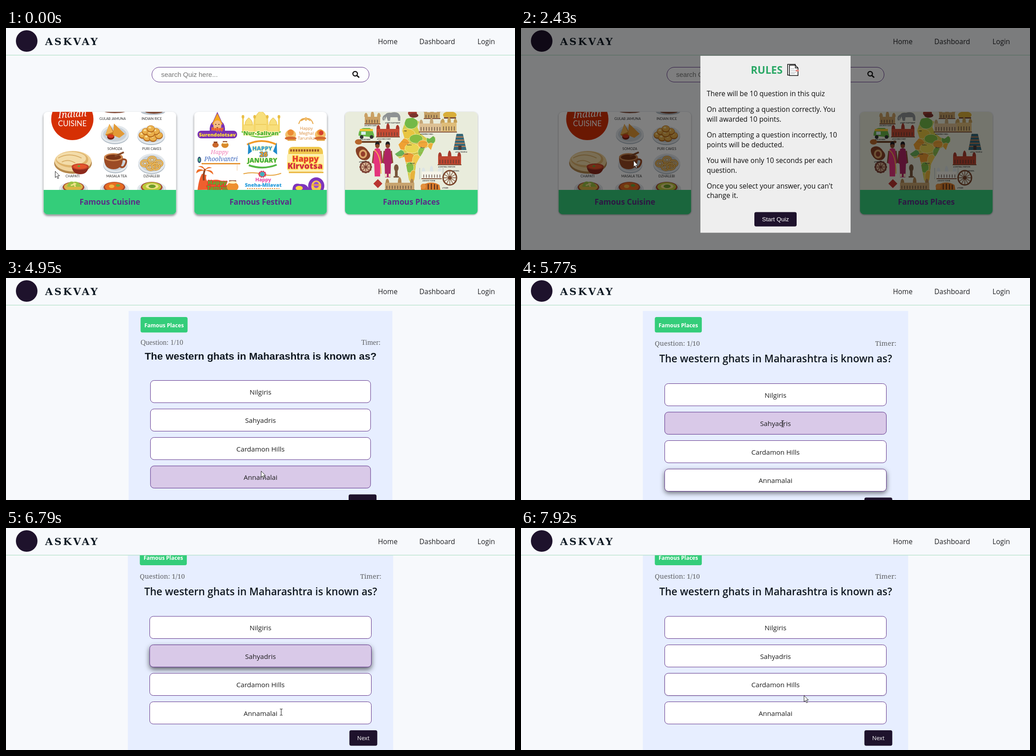
Recreate the animation shown at these times as an HTML page. Size 1132 by 495 pixels, loop 7.99 s.

```html
<!DOCTYPE html>
<html lang="en">
<head>
<meta charset="utf-8">
<title>Quiz site</title>
<style>
html, body { margin: 0; width: 100%; height: 100%; overflow: hidden; background: #f7f9fc; }
svg { display: block; width: 100%; height: 100%; font-family: "Open Sans", sans-serif; }
.sans { font-family: "Liberation Sans", sans-serif; }
.serif { font-family: "Liberation Serif", serif; }
.slab { font-family: "Noto Serif", serif; }
.brand { font-family: "DejaVu Serif", serif; font-weight: 700; letter-spacing: 3.5px; }
.label { font-family: Lato, sans-serif; }
.script { font-family: "Noto Serif", serif; font-style: italic; }
.outlined { paint-order: stroke; stroke-linejoin: round; font-weight: 800; }
.mid { text-anchor: middle; }
.end { text-anchor: end; }
.w5 { font-weight: 500; }
.w6 { font-weight: 600; }
.w7 { font-weight: 700; }
</style>
</head>
<body>
<svg id="stage" viewBox="0 0 1132 495"></svg>
<script>
const LOOP = 7990, INK = '#1e122c', PURPLE = '#5b2d87', GREEN = '#34cd7a';

// Drawing helpers returning SVG markup
const rect = (x, y, w, h, fill, more = '') => `<rect x="${x}" y="${y}" width="${w}" height="${h}" fill="${fill}" ${more}/>`;
const oval = (x, y, rx, ry, fill, more = '') => `<ellipse cx="${x}" cy="${y}" rx="${rx}" ry="${ry}" fill="${fill}" ${more}/>`;
const path = (d, fill, more = '') => `<path d="${d}" fill="${fill}" ${more}/>`;
const line = (d, color, width, more = '') => path(d, 'none', `stroke="${color}" stroke-width="${width}" ${more}`);
const text = (x, y, size, fill, cls, s, more = '') => `<text x="${x}" y="${y}" font-size="${size}" fill="${fill}" class="${cls}" ${more}>${s}</text>`;
const group = (id, body, more = '') => `<g id="${id}" ${more}>${body}</g>`;
const ring = (n, fn) => Array.from({ length: n }, (_, i) => fn(Math.cos(i * 2 * Math.PI / n), Math.sin(i * 2 * Math.PI / n), i)).join('');

function cuisineArt() {
  const plate = (x, y, rx = 31, ry = 20) => oval(x, y + 1, rx, ry, '#aeb9c3') + oval(x, y - 1, rx, ry, '#e3e8ec') + oval(x, y - 1, rx - 5, ry - 4, '#c9d1d8');
  const bowl = (x, food) => plate(x, 359, 32, 15) + oval(x, 355, 24, 12, '#a8482f') + oval(x, 354, 21, 10, food);
  const name = (x, y, s) => text(x, y, 7.6, '#333', 'label mid', s);
  const fried = (x, y) => oval(x, y, 9, 8, '#b76b1d') + oval(x, y - 1, 8, 6.5, '#eab04b') + oval(x - 2, y - 3, 3, 2, '#f9dd94');
  const curl = (x, y) => oval(x, y, 9, 7, 'none', 'stroke="#b8791e" stroke-width="4"') + oval(x, y, 9, 7, 'none', 'stroke="#efc168" stroke-width="2.5"') + oval(x, y, 4, 3, 'none', 'stroke="#dca23e" stroke-width="2"');
  return oval(147.5, 203, 47, 47, '#d63004') +
    text(148, 199, 21, '#fff', 'script mid', 'Indian', 'transform="rotate(-4 148 199)"') + text(147.5, 219, 16.5, '#fff', 'label mid', 'CUISINE') +
    oval(242, 185, 25, 5, '#8b5643') + oval(327, 187, 27, 7, '#bcc5cd') + oval(329, 186, 20, 5, '#7e4933') +
    plate(242, 238) + path('M221 238 230 214 244 239 232 246Z', '#c7751d') + path('M238 239 240 213 264 236 252 245Z', '#e39a36') + path('M221 238 230 214 238 232Z', '#f0b659') +
    oval(233, 243, 8, 6, '#7c2215') + oval(233, 241, 7, 4, '#d93a20') +
    plate(323, 240) + [[304, 239], [314, 245], [327, 246], [340, 240], [311, 231], [333, 231], [322, 236], [322, 225]].map(p => fried(...p)).join('') +
    oval(149, 301, 42, 24, '#b68a4e') + oval(149, 297, 41, 23, '#f0d39b') + oval(147, 293, 36, 18, '#dfb46c') + oval(145, 291, 33, 15, '#f3dca9') + line('M116 290q24-14 52 0M124 299q14-8 30 2', '#d8ae68', 2) +
    path('M146 308h38q-2 18-19 18t-19-18Z', '#8d2a1c') + oval(165, 309, 19, 7, '#c2422a') + oval(165, 309, 15, 5, '#e5562b') + oval(162, 308, 3, 2, '#6aa53a') +
    plate(243, 304, 27, 19) + path('M218 289h42q0 26-21 26t-21-26Z', '#9c4b25') + line('M258 293q13-2 8 10t-13 5', '#9c4b25', 4) + oval(239, 288, 21, 9, '#d08a52') + oval(239, 288, 17, 6, '#7b3617') + line('M242 286 262 277', '#874b2a', 4) +
    plate(324, 303, 30, 22) + [[309, 302], [325, 294], [339, 302], [322, 310], [333, 309]].map(p => curl(...p)).join('') +
    bowl(150, '#d9b647') + path('M136 354q3-15 14-11 13-3 17 11Z', '#9ac143') + line('M144 351l12-4M151 345l3 9', '#f1e28b', 3) +
    bowl(241, '#e66b22') + oval(235, 353, 6, 4, '#f2b340') + oval(249, 351, 5, 3, '#6ea53c') +
    bowl(324, '#b9c93a') + oval(325, 353, 14, 6, '#f1e28b') + oval(325, 353, 8, 4, '#6d9d2d') +
    [[237, 205, 'GULAB JAMUNA'], [324, 205, 'INDIAN RICE'], [242, 272, 'SOMOZA'], [324, 272, 'PURI CAKES'], [148, 332.5, 'CHAPATI'], [246, 332.5, 'MASALA TEA'], [324, 332.5, 'DZHALEBI']].map(n => name(...n)).join('');
}

function festivalArt() {
  const sign = (x, y, size, fill, edge, width, s) => text(x, y, size, fill, 'outlined mid', s, `stroke="${edge}" stroke-width="${width}"`);
  const dome = (x, y, r) => path(`M${x - r} ${y}q-2-${r} ${r}-${2 * r} ${r + 2} ${r} ${r} ${2 * r}Z`, '#f8df7c', 'stroke="#e4bc43"');
  const pot = (x, y, r, c) => oval(x, y, r, r * .8, c) + rect(x - r * .6, y - r * 1.1, r * 1.2, 3, '#8b3f1f');
  return path('M453 231q-1-16 7-22l10-22 10 22q8 6 7 22Z', '#7931b5') + path('M458 215l12-25 12 25Z', '#f3a71f') + oval(470, 217, 9, 11, '#f6bd82') + line('M465 215h3m4 0h3m-7 7h4', '#5f2b20', 1.5) +
    rect(426, 229, 88, 17, '#7931b5', 'rx="8"') + sign(470, 228, 8, '#e83832', '#f6c12a', 1, 'Happy') + sign(470, 242, 11, '#ffe431', '#7931b5', 4, 'Surendolotsav') +
    rect(528, 215, 78, 16, '#f8df7c') + dome(567, 215, 16) + [540, 594].map(x => dome(x, 216, 8)).join('') + [527, 553, 581, 607].map(x => rect(x - 2, 198, 4, 33, '#f5d66a') + oval(x, 198, 3, 4, '#e9bf47')).join('') + line('M567 184v-8', '#dfb238', 2) +
    line('M524 231q43 25 87 0', '#74c843', 3) + sign(567, 239, 13, '#47ad32', '#fff4b4', 3, 'Nur-Salivan') +
    line('M651 214q4-14 16-12 12-2 16 12M656 207l11-6 10 6', '#e9aa4c', 2) + oval(667, 203, 3, 4, '#f3bd6a') +
    ['Happy', 'Meghal', 'Tarunika'].map((s, i) => text(668, 227 + i * 11, 9.5, '#d98a38', 'w5 mid', s)).join('') +
    [633, 699].map(x => oval(x, 238, 12, 11, '#f3c16c') + oval(x, 233, 7, 7, '#ec8c33') + oval(x, 246, 13, 4, '#d56a31')).join('') + oval(701, 234, 5, 5, '#d43f2d') + line('M626 250h19M691 250h18', '#e3a343', 3) +
    pot(466, 261, 7, '#c9672c') + pot(487, 261, 8, '#d98a2b') + oval(487, 256, 6, 2, '#fff0c9') +
    text(475, 281, 13, '#f07db5', 'script mid', 'Happy') + text(478, 297, 13.5, '#3b65bd', 'script mid', 'Phoolvantri') + oval(430, 294, 4, 7, '#304f78') + oval(430, 294, 2, 4, '#58bd8c') +
    rect(435, 301, 86, 3, '#e69638') + line('M514 303v15', '#efc291', 1) +
    line('M536 260q32-16 66 0', '#f29b28', 4) + line('M540 306q31 11 62-1', '#55b843', 4) + path('M539 255l8 20-9 7Zm63 0l-8 20 9 7Z', '#218bcb') +
    sign(570, 273, 13, '#2f9bd4', '#fff6b4', 2.5, 'HAPPY') + sign(573, 287, 15, '#f59e27', '#2685c3', 2, '26') + sign(570, 300, 14, '#37ac3d', '#fff6b4', 2, 'JANUARY') +
    rect(625, 278, 82, 43, '#fdf0b4', 'rx="8"') + path('M628 281q-2-17 12-16h52q14-1 13 16Z', '#f0c84e') + line('M632 273h66', '#9b5227', 5, 'stroke-dasharray="4 2"') + line('M629 322h77', '#eab43c', 3) +
    sign(666, 298, 18, '#e33a2b', '#ffe05f', 4, 'Happy') + sign(665, 314, 18, '#cf2840', '#ffe05f', 4, 'Kirvotsa') +
    path('M426 361q3-25 10-36l10 3q-3 8 2 14 35-13 46 18Z', '#ef5f2e') + line('M440 340q-2-15 3-26', '#8a4322', 4) + path('M442 318q-18-9-19 6 9-7 19-6 18-5 19 9-8-9-19-9-2-14-15-9 11 1 15 9 6-12 16-6-11 0-16 6Z', '#ee6e28') +
    sign(470, 349, 13, '#57b72e', '#e6372b', 3, 'Happy') + sign(470, 361, 13, '#57b72e', '#e6372b', 3, 'Tamrul') + pot(504, 354, 13, '#ee902f') + oval(504, 344, 10, 3, '#fff0c2') +
    line('M528 325q22-5 42 1 19 6 42-2', '#e6a23a', 2) + ring(10, (c, s) => oval(570 + c * 7, 326 + s * 6, 2, 2, '#d83b57')) + oval(570, 326, 5, 5, '#40aebd') +
    text(572, 342, 11, '#e7399c', 'w7 mid', 'Happy') + sign(572, 354, 11, '#2f9edc', '#e4f6ff', 1, 'Sneha-Milavat') + line('M536 358h72', '#e69638', 2, 'stroke-dasharray="3 2"') +
    oval(690, 352, 18, 19, '#7e36bc') + oval(690, 353, 11, 13, '#f2c94e') + oval(690, 350, 6, 7, '#9a4ed2') + path('M637 361q1-18 17-13 15-2 21 13Z', '#7e36bc') + oval(652, 357, 8, 5, '#ffd93d') + line('M680 350h21', '#f2a53c', 3);
}

function placesArt() {
  const building = (x, y, w, h, c, roof = c) => rect(x, y, w, h, c) + rect(x - 1, y + h - 2, w + 2, 2, '#81523c') +
    line(`M${x + 3} ${y + h * .6}h${w - 5}`, '#513d36', h * .42, 'stroke-dasharray="2 4" opacity=".65"') +
    [.08, .5, .92].map((k, i) => path(`M${x + w * k - 4} ${y}q0-${i == 1 ? 11 : 8} 4-${i == 1 ? 13 : 9} 4 ${i == 1 ? 3 : 2} 4 ${i == 1 ? 13 : 9}Z`, roof)).join('');
  const caption = (x, y, s) => text(x, y, 4, '#333', 'label w7', s);
  const land = 'M890 202l15-2 14 9-4 12 6 14 12 9 9 3 8-6 5 3v9l-6 7-4 12-6-7-8 4-6 12-6 9-7 13-2 18-2 17-6 12-6-12-6-33-4-18-11 4-10-10 13-9-5-12 13-15-5-17Z';
  const states = [[901, 212, 15, 13, '#73b948'], [893, 236, 17, 11, '#e8c541'], [912, 247, 15, 10, '#86bd42'], [884, 259, 14, 13, '#f0a133'], [903, 268, 16, 11, '#e9d552'], [874, 279, 12, 8, '#69b35a'], [927, 259, 11, 9, '#f1a63a'], [925, 277, 9, 11, '#8bc350'], [895, 289, 14, 11, '#ee9b32'], [913, 294, 9, 12, '#f0ca4c'], [898, 311, 9, 12, '#7fbd48'], [906, 332, 8, 15, '#e7b33d'], [945, 249, 10, 10, '#6eb64d'], [945, 264, 7, 8, '#edb03a']];
  const person = (x, dress, legs) => oval(x, 262, 5, 6, '#8a4b2c') + path(`M${x - 5} 261q0-8 5-8t5 8q-5-4-10 0Z`, '#201c20') + path(`M${x - 6} 270q6-4 12 0l5 31-4 2-1 ${legs}h-12l-1-${legs}-4-2Z`, dress) + line(`M${x - 8} 274l-3 27m19-27 3 27`, '#8a4b2c', 2.5);
  return rect(754, 187, 295, 175, '#e9ecdc') +
    `<clipPath id="land"><path d="${land}"/></clipPath>` +
    group('map', path(land, '#d5cb49') + states.map(s => oval(...s, 'stroke="#fff5c4" stroke-width=".7"')).join('') + line('M872 252l35 6 40-5M866 286l35-5 36-4M888 308l26-4', '#b48a36', .6) +
      [[885, 231], [892, 262], [922, 268], [884, 282], [899, 303]].map(([x, y], i) => caption(x, y, ['Hill', 'Delta', 'River', 'Coast', 'South'][i])).join(''), 'clip-path="url(#land)"') +
    building(798, 198, 34, 17, '#caa064') + path('M842 207q-3-20 14-18 18-5 21 9v9h-5l-1-8h-16l-1 8h-5l-3-10Z', '#8e9293') + line('M844 194q-8 5-4 12', '#8e9293', 3) +
    oval(904, 190, 10, 7, '#a23c30') + oval(907, 195, 10, 5, '#7a332d') + building(930, 188, 35, 15, '#c5a064') + oval(987, 194, 15, 8, '#d9ae39') + rect(974, 199, 27, 3, '#784b37') +
    path('M784 240q0-16 12-17h13q9 5 10 21Z', '#67b447') + rect(787, 225, 29, 5, '#f0c433') + rect(790, 231, 10, 7, '#d6efed') + [791, 813].map(x => oval(x, 243, 4, 4, '#333')).join('') +
    building(824, 225, 51, 19, '#c54a34', '#a9372a') + building(919, 213, 55, 20, '#ddc094', '#c6a777') + building(969, 211, 33, 22, '#dfbd7a', '#c6a056') +
    line('M780 254h48', '#6d4125', 4) + oval(784, 254, 8, 6, '#b6672d') + oval(831, 254, 4, 3, '#6d4125') +
    path('M782 266q13-7 23 8 11 12-2 20-15 4-23-12-5-13 2-16Z', '#874126') + oval(794, 281, 9, 10, '#dba76a') + oval(794, 281, 5, 6, '#943e2b') +
    ring(12, (c, s) => oval(800 + c * 10, 310 + s * 10, 4, 4, '#7d4336')) + oval(800, 310, 10, 10, '#d9b494') + ring(8, (c, s) => line(`M800 310l${c * 9} ${s * 9}`, '#7d4336', 1.5)) + oval(800, 310, 3, 3, '#7d4336') +
    person(826, '#e4347c', 28) + line('M819 272q15 10 15 53', '#f3be45', 2) + person(849, '#ae2463', 30) + line('M845 325v7m8-7v7', '#f1dfbd', 4) +
    oval(868, 312, 5, 8, '#78563c') + rect(865, 317, 6, 15, '#78563c') + line('M862 332h12', '#78563c', 3) +
    path('M1002 236h14l8 36h-29Z', '#376878') + line('M1001 243h16M999 250h20M998 257h22M996 264h26', '#ce8150', 2) + rect(1006, 262, 7, 10, '#473b3b') +
    building(961, 286, 51, 20, '#bd452f', '#a53b2c') + building(925, 320, 43, 17, '#f6f4e9', '#dce4e5') + rect(919, 312, 2, 25, '#c8cfcb') + rect(971, 312, 2, 25, '#c8cfcb') +
    oval(987, 334, 15, 16, 'none', 'stroke="#79442a" stroke-width="3"') + ring(12, (c, s) => line(`M987 334l${c * 14} ${s * 15}`, '#79442a', 1.3)) + oval(987, 334, 4, 4, '#79442a') +
    path('M827 337l10 10-10 10-10-10Z', '#b93531') + building(843, 345, 65, 17, '#c7a36e', '#b18650') + path('M923 361q-2-13 10-14 16-6 31 3l2 11Z', '#d77a2b') + oval(928, 353, 6, 6, '#e3903d') + line('M939 348v12m7-13v13m7-12v12m6-10v10', '#4c2c1d', 2) +
    [[797, 219, '•NORTH GATE'], [843, 213, '•GREY ELEPHANT'], [825, 249, '•OLD RED FORT'], [787, 250, '•RICKSHAW'], [921, 238, '•MARBLE HALL'], [785, 300, '•PAISLEY'], [999, 278, '•HILL TEMPLE'], [961, 311, '•CENTRAL STATION'], [992, 320, '•WHEEL'], [926, 342, '•WHITE TOMB'], [970, 358, '•TIGER']].map(c => caption(...c)).join('');
}

const card = (i, title, art) => {
  const x = 83.5 + i * 335.2;
  return `<clipPath id="clip${i}"><rect x="${x}" y="187" width="295" height="228.5" rx="9"/></clipPath>` +
    rect(x, 187, 295, 228.5, '#fff', `rx="9" id="card${i}"`) +
    `<g clip-path="url(#clip${i})"><svg x="${x}" y="187" width="295" height="174.5" viewBox="${x} 187 295 174.5">${art}</svg>${rect(x, 361, 295, 55, GREEN)}</g>` +
    text(x + 147.5, 394, 17.3, PURPLE, 'w7 mid', title);
};

const home = rect(324.5, 87.5, 483, 33, '#fdfeff', `rx="16.5" stroke="${PURPLE}"`) +
  text(345, 108.5, 14.9, '#757575', 'sans', 'search Quiz here...') +
  oval(776.5, 102, 5, 5, 'none', 'stroke="#111" stroke-width="2.4"') + line('M780.5 106l5 4.5', '#111', 3) +
  card(0, 'Famous Cuisine', cuisineArt()) + card(1, 'Famous Festival', festivalArt()) + card(2, 'Famous Places', placesArt());

const OPTIONS = ['Nilgiris', 'Sahyadris', 'Cardamon Hills', 'Annamalai'];
// Before the web fonts arrive the panel is slightly narrower and tighter
function quiz(id, loaded) {
  const grow = loaded ? 1.7 : 0, top = loaded ? 235.5 : 228.5, small = loaded ? 'slab' : 'serif';
  const size = loaded ? 14.8 : 16, base = loaded ? 151 : 149;
  return group(id, rect(272.7 - grow, 73.5, 586.6 + 2 * grow, 600, '#e7eeff') +
    rect(299.3 - grow, 87, 104.5, 34.5, GREEN, 'rx="4"') + text(351.5 - grow, 109.5, 12, '#fff', 'w7 mid', 'Famous Places') +
    text(299.3 - grow, base, size, '#5e6063', small, 'Question: 1/10') + text(833 + grow, base, size, '#5e6063', `${small} end`, 'Timer:') +
    text(566.3, loaded ? 188 : 182, 22.7, '#101820', loaded ? 'w6 mid' : 'sans w7 mid', 'The western ghats in Maharashtra is known as?') +
    OPTIONS.map((name, i) => rect(321.3 - grow, top + i * 63.5, 489.5 + 2 * grow, 49.5, '#fff', `rx="8" stroke="${PURPLE}" class="option${i}"`) +
      text(566, top + 31 + i * 63.5, 15.1, '#1c1c1c', 'mid', name)).join('') +
    rect(762 + grow, top + 254, 62, 34.5, INK, 'rx="4"') + text(793 + grow, top + 276, 12.7, '#fff', 'mid', 'Next'));
}

const header = rect(0, 0, 1132, 60, '#f7f9fc') + rect(0, 60, 1132, 1, '#a3dcbd') +
  oval(46, 29, 24, 24, INK) + text(87, 38, 22, '#111c26', 'brand', 'ASKVAY') +
  [[849, 'Home'], [959, 'Dashboard'], [1068, 'Login']].map(([x, s]) => text(x, 36, 15.4, '#202124', 'w5 mid', s)).join('');

const RULES = [[147, 'There will be 10 question in this quiz'], [182, 'On attempting a question correctly. You'], [203.5, 'will awarded 10 points.'],
  [239, 'On attempting a question incorrectly, 10'], [260.5, 'points will be deducted.'], [296, 'You will have only 10 seconds per each'], [317.5, 'question.'],
  [353, "Once you select your answer, you can't"], [374, 'change it.']];
const modal = rect(0, 0, 1132, 495, '#000', 'opacity=".5"') + rect(399, 62, 334, 394.5, '#eee') +
  text(511, 101.5, 22.9, '#2ba866', 'w7', 'RULES') +
  path('M593 81h17v24h-17Z', '#fff', 'stroke="#111" stroke-width="1.6"') + path('M597 83h13l6 6v17h-19Z', '#fff', 'stroke="#111" stroke-width="1.6"') + line('M610 83v6h6', '#111', 1.4) +
  line('M600 91h8M600 95h12M600 99h12M600 102h9', '#9aa3aa', 1) + rect(611, 93, 7, 4, '#e58a83', 'rx="1"') +
  RULES.map(([y, s]) => text(413, y + 5, 15.5, '#0c0c0c', 'w5', s)).join('') +
  rect(519, 410.5, 94, 32, INK, 'rx="4"') + text(566, 430.5, 13.5, '#fff', 'sans mid', 'Start Quiz');

const outline = 'stroke="#222" stroke-width="1" stroke-linejoin="round"';
const cursors = group('arrow', path('M.5.5v14l3.2-3 2.3 5.3 2.2-1-2.3-5.2h4.3Z', '#fff', outline)) +
  group('beam', line('M-3-7h2l1 1 1-1h2M0-6V6M-3 7h2l1-1 1 1h2', '#222', 1.1)) +
  group('hand', path('M-1.5 1q1.5-2 3 0v6q2-1.5 3 .5 2-1 3 .5 2-.5 2 1.5v4q0 5-3 5.5h-5.5q-3-2-4.5-6l-2-3q0-2 2-1.2l2 2Z', '#fff', outline));

const stage = document.getElementById('stage');
stage.innerHTML = group('home', home) + quiz('plain', false) + quiz('styled', true) + group('header', header) + group('modal', modal) + group('cursor', cursors);
const $ = id => document.getElementById(id);
const show = (id, on) => { $(id).style.display = on ? '' : 'none'; };
const clamp = v => Math.max(0, Math.min(1, v));

// Pointer path: time, x, y, shape
const POINTER = [
  [0, 109, 319, 'arrow'], [70, 109, 319], [70, 213, 382, 'beam'], [400, 213, 382], [600, 232, 373, 'arrow'], [1140, 261, 292], [1210, 260, 291], [1340, 251, 291],
  [1870, 251, 291], [1870, 247, 287], [2020, 247, 287], [2020, 250, 294], [2630, 250, 296], [3000, 405, 385], [3400, 552, 437, 'hand'], [3470, 555, 437], [3680, 574, 436],
  [4010, 574, 436, 'arrow'], [4150, 567, 430], [5690, 567, 430], [5740, 578, 345, 'beam'], [5770, 582, 325], [5900, 582, 325], [6300, 586, 297, 'arrow'], [6720, 596, 300],
  [6760, 609, 390, 'beam'], [6790, 612, 410], [6860, 616, 440, 'arrow'], [6930, 618, 350], [7110, 620, 225], [7250, 620, 225], [7480, 622, 265], [7620, 626, 330], [7800, 629, 366], [7920, 629, 373], [LOOP, 629, 373]];
function pointerAt(t) {
  const next = POINTER.findIndex(k => k[0] > t);
  const [t0, x0, y0] = POINTER[next - 1], [t1, x1, y1] = POINTER[next];
  const k = (t - t0) / (t1 - t0);
  const shape = POINTER.slice(0, next).reverse().find(p => p[3])[3];
  return { x: x0 + (x1 - x0) * k, y: y0 + (y1 - y0) * k, shape };
}

// Answer under the pointer: start time, option index
const HOVERS = [[4930, 3], [5740, 1], [6820, 3], [6930, 2], [7030, 1], [7110, 0], [7480, 1], [7620, 2], [7800, -1], [LOOP, -1]];
const hoveredAt = t => HOVERS.reduce((found, [start, i]) => t >= start ? i : found, -1);
function glowAt(option, t) {
  let glow = 0;
  for (let i = 0; i < HOVERS.length - 1 && HOVERS[i][0] < t; i++) {
    const change = (Math.min(t, HOVERS[i + 1][0]) - HOVERS[i][0]) / 250;
    glow = clamp(glow + (HOVERS[i][1] === option ? change : -change));
  }
  return glow;
}

function draw(t) {
  const onQuiz = t >= 4750, loaded = t >= 5020;
  show('home', !onQuiz);
  show('plain', onQuiz && !loaded);
  show('styled', onQuiz && loaded);

  const fade = onQuiz ? 0 : clamp((t - 2020) / 200);
  show('modal', fade > 0);
  $('modal').style.opacity = fade;

  const glows = [t < 70 ? .4 : clamp((2430 - t) / 280), t < 70 ? .4 : 0, 0];
  glows.forEach((g, i) => {
    $('card' + i).style.filter = `drop-shadow(0 ${1 + 5 * g}px ${1.5 + 2.5 * g}px rgba(0,0,0,${.4 + .2 * g}))`;
  });

  const hovered = hoveredAt(t);
  OPTIONS.forEach((_, i) => {
    const g = glowAt(i, t);
    for (const box of document.getElementsByClassName('option' + i)) {
      box.setAttribute('fill', i === hovered ? '#d9c9e8' : '#fff');
      box.style.filter = g ? `drop-shadow(0 ${5 * g}px ${6 * g}px rgba(0,0,0,${.6 * g}))` : 'none';
    }
  });

  const s = clamp((t - 5830) / 400);
  $('styled').setAttribute('transform', `translate(0 ${-38.5 * s * s * (3 - 2 * s)})`);

  const pointer = pointerAt(t);
  $('cursor').setAttribute('transform', `translate(${pointer.x} ${pointer.y})`);
  ['arrow', 'beam', 'hand'].forEach(id => show(id, id === pointer.shape));
}

const began = performance.now();
function tick() {
  draw((performance.now() - began) % LOOP);
  requestAnimationFrame(tick);
}
tick();
</script>
</body>
</html>
```
